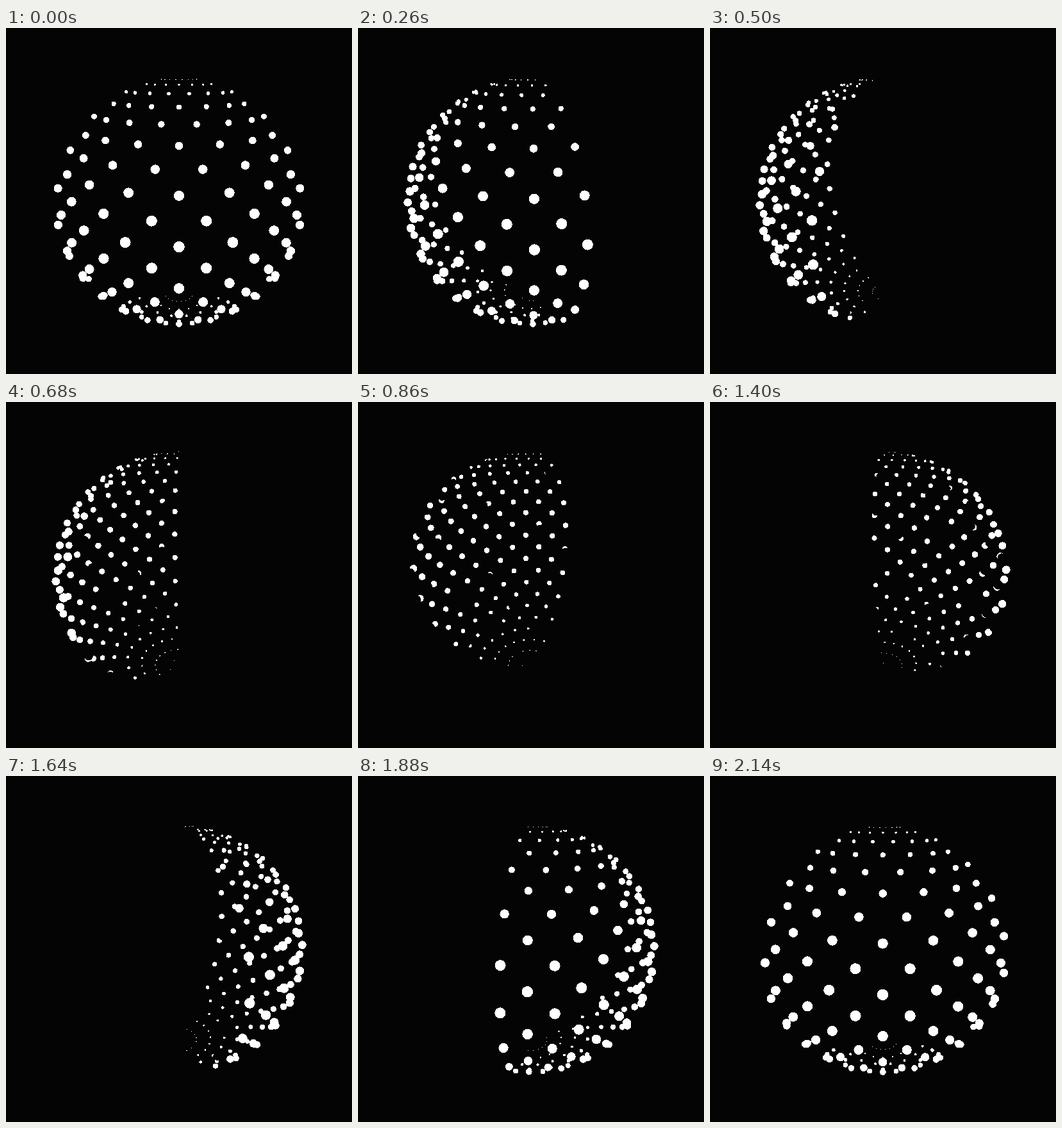
Animation, 540 px wide and 540 px high, one loop 2.16 s. Source, as an HTML page:

```html
<!DOCTYPE html>
<html lang="en">
<head>
<meta charset="utf-8">
<title>Dotted globe</title>
<style>
  html, body { margin: 0; width: 100%; height: 100%; overflow: hidden; background: #040404; }
  svg { display: block; width: 100vw; height: 100vh; }
</style>
</head>
<body>
<svg id="stage" viewBox="0 0 540 540" shape-rendering="crispEdges"></svg>
<script>
const LOOP = 2160, STEP = 20;
const CENTER = 270, RADIUS = 178, CAMERA = 467.65, TILT = 0.4;
const COLUMNS = 20, HALF_ROWS = 11;
const DOT = 5.6, POLE_SHRINK = 1.15;
const LIT_HALF_WIDTH = 65 * Math.PI / 180;
const LIGHT = '#fff', DARK = '#040404';

const TURN = 2 * Math.PI;
const rowStep = Math.PI / 2 / HALF_ROWS;
const columnStep = TURN / COLUMNS;
const sinTilt = Math.sin(TILT), cosTilt = Math.cos(TILT);

const stage = document.getElementById('stage');
const circles = [];
for (let i = 0; i < 2 * HALF_ROWS * COLUMNS; i++) {
  const circle = document.createElementNS('http://www.w3.org/2000/svg', 'circle');
  circles.push(stage.appendChild(circle));
}

// Perspective view of a dot at the given latitude and longitude.
function project(lat, lon) {
  const ring = Math.max(0, Math.cos(lat)), height = Math.sin(lat);
  const forward = ring * Math.cos(lon);
  const depth = RADIUS * (forward * cosTilt + height * sinTilt);
  const scale = CAMERA / (CAMERA - depth);
  return {
    x: CENTER + RADIUS * ring * Math.sin(lon) * scale,
    y: CENTER + RADIUS * (forward * sinTilt - height * cosTilt) * scale,
    r: DOT * ring ** POLE_SHRINK * scale,
    depth
  };
}

function angleBetween(a, b) {
  return Math.abs(Math.atan2(Math.sin(a - b), Math.cos(a - b)));
}

// The lattice slides one row down and half a column across per loop,
// while the lit sector makes a full turn the other way.
function dotsAt(p) {
  const dots = [];
  for (let row = 1 - HALF_ROWS; row <= HALF_ROWS; row++) {
    const stagger = row % 2 ? 0 : 0.5;
    for (let column = 0; column < COLUMNS; column++) {
      const lon = (column + stagger + p / 2) * columnStep;
      const dot = project((row - p) * rowStep, lon);
      dot.lit = angleBetween(lon, -p * TURN) <= LIT_HALF_WIDTH;
      dots.push(dot);
    }
  }
  return dots.sort((a, b) => a.depth - b.depth);
}

function draw(ms) {
  const p = Math.floor(ms % LOOP / STEP) * STEP / LOOP;
  dotsAt(p).forEach((dot, i) => {
    const circle = circles[i];
    circle.setAttribute('cx', dot.x.toFixed(2));
    circle.setAttribute('cy', dot.y.toFixed(2));
    circle.setAttribute('r', dot.r.toFixed(2));
    circle.setAttribute('fill', dot.lit ? LIGHT : DARK);
  });
}

const start = performance.now();
function tick() {
  draw(performance.now() - start);
  requestAnimationFrame(tick);
}
tick();
</script>
</body>
</html>
```
